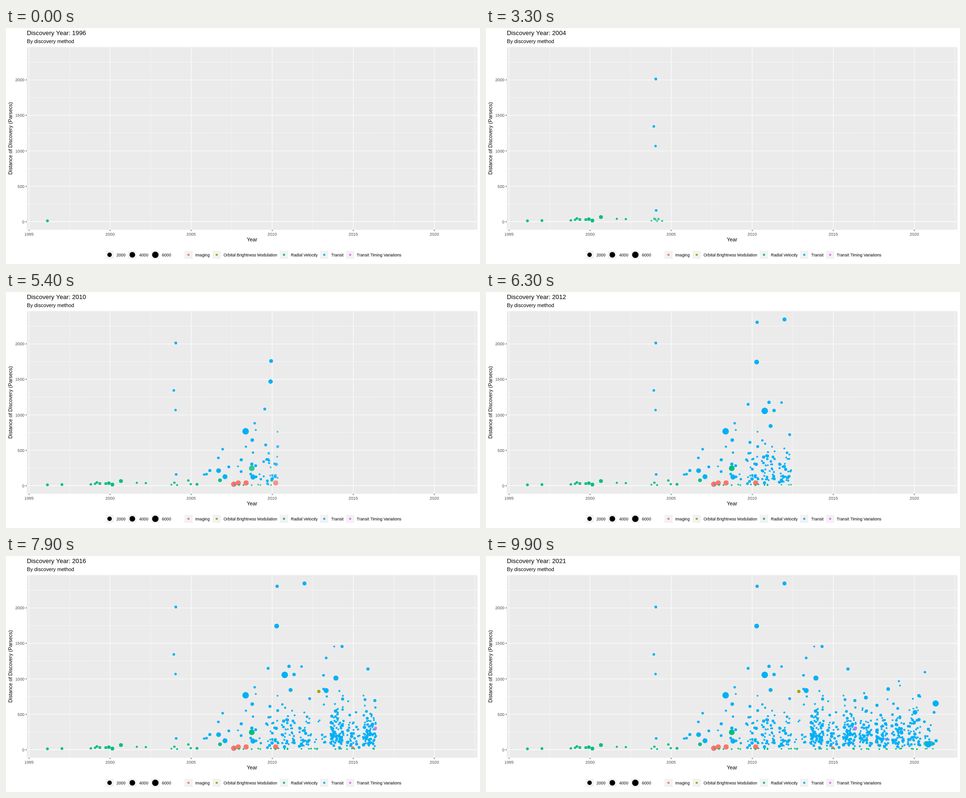
Animation of 1000x500 px, one loop 10 s. Source, as an HTML page with a canvas:

```html
<!DOCTYPE html>
<html lang="en">
<head>
<meta charset="utf-8">
<title>Discovery Year</title>
<style>
  html, body { margin: 0; width: 100%; height: 100%; overflow: hidden; background: #fff; }
  canvas { display: block; }
</style>
</head>
<body>
<canvas id="chart" width="1000" height="500"></canvas>
<script>
const ctx = document.getElementById('chart').getContext('2d');
const FRAMES = 100, FRAME_MS = 100, FIRST = 1996, LAST = 2021;
const FONT = '"Liberation Sans", Arial, sans-serif';
const yearX = year => 48.6 + (year - 1995) * 34.2;
const xYear = x => Math.round(1995 + (x - 48.6) / 34.2);
const distanceY = d => 410.4 - d * 0.1502;
const keyFrame = year => Math.round((year - FIRST) * (FRAMES - 1) / (LAST - FIRST));

// Drawn from back to front; dots are the landmarks as [x, y, radius].
const methods = [
  { label: 'Imaging', color: '#F8766D', x: 385, textX: 399, dots: [
    [480.5, 407.3, 5.7], [490, 404.5, 5.5], [506.5, 404.5, 5.5], [569, 404.5, 5.5],
    [731.5, 406, 3], [824, 393.5, 3.8]] },
  { label: 'Orbital Brightness Modulation', color: '#A3A500', x: 444.5, textX: 459, dots: [
    [660, 287, 3.4]] },
  { label: 'Radial Velocity', color: '#00BF7D', x: 586.5, textX: 601, dots: [
    [87.4, 408.5, 2.9], [118, 408, 2.9], [198, 405.7, 3], [179, 407.5, 2.6], [188, 406.3, 2.5],
    [191.8, 403.5, 2.7], [210.5, 406, 3], [217, 405, 3.7], [224.5, 408, 3.9], [242.5, 400.5, 4.1],
    [295, 404.8, 2.4], [276, 404.3, 2.2], [349, 408.3, 1.9], [355.3, 404, 2.5], [361, 409, 2],
    [384.6, 399.2, 2.5], [389.7, 407.2, 2.4], [403, 407.5, 2.9], [451.5, 398.8, 3.9],
    [518.5, 373.5, 6], [928, 397.5, 5], [940, 397.5, 5]] },
  { label: 'Transit', color: '#00B0F6', x: 671.5, textX: 686, dots: [
    [354, 208.5, 2.7], [357.7, 250, 2.6], [358.2, 108, 2.9], [359, 386.5, 2.8],
    [418, 386.8, 2.5], [423, 386, 2.8], [430, 378.2, 3.2], [448.5, 378.5, 5.1],
    [448, 351.5, 2.8], [457, 333, 2.7], [462, 391.3, 5.2], [470, 370.4, 3],
    [505.5, 295.2, 6.9], [521, 392, 5.4], [519.5, 313.7, 3.7], [524.6, 278, 2.6],
    [572, 64.2, 3.4], [571, 148.4, 5], [553, 238, 3.1], [588, 251.8, 6.9], [597, 233.7, 3.5],
    [607.7, 251, 3.6], [600.4, 283.9, 4.2], [629.7, 58.2, 4.1], [623.5, 234.2, 2.6],
    [675.5, 285, 5.3], [675.5, 216, 2.8], [696, 258.6, 5.4], [692.5, 191.8, 2], [709, 191.8, 3.2],
    [763.6, 239.3, 3.4], [801.5, 300, 4], [848.5, 281.9, 3.8], [905, 331.3, 5],
    [926, 246, 2.6], [948.6, 312.3, 6.6], [933, 399, 6.8]] },
  { label: 'Transit Timing Variations', color: '#E76BF3', x: 726, textX: 740, dots: [
    [779.5, 364.5, 3.5], [843, 387.5, 2]] }
];
const radial = methods[2], transit = methods[3];

let seed = 7;
function random() {
  seed = (seed * 1664525 + 1013904223) % 4294967296;
  return seed / 4294967296;
}
const jitteredX = year => yearX(year - 0.4 + 0.8 * random());

// Transits from 2008 on: most lie a few hundred parsecs away, with a thin far tail.
const transitCounts = [4, 9, 27, 38, 34, 14, 92, 34, 88, 60, 60, 62, 54, 14];
transitCounts.forEach((count, i) => {
  for (let n = 0; n < count; n++) {
    const distance = 25 - 125 * Math.log((1 - random()) * (1 - random()));
    transit.dots.push([jitteredX(2008 + i), distanceY(Math.min(distance, 1050)),
      1.9 + 1.6 * random() ** 2]);
  }
});

// A few small, near radial velocity dots every year.
for (let year = 2008; year <= LAST; year++) {
  for (let n = 0; n < 3; n++) radial.dots.push([jitteredX(year), 407.5 + 2 * random(), 1.8]);
}

for (const m of methods) {
  m.byYear = {};
  for (const [x, y, r] of m.dots) (m.byYear[xYear(x)] ||= []).push({ x, y, r });
}
const years = [];
for (let y = FIRST; y <= LAST; y++) if (methods.some(m => m.byYear[y])) years.push(y);

function text(string, x, y, size, color = '#000', align = 'left') {
  ctx.font = `${size}px ${FONT}`;
  ctx.fillStyle = color;
  ctx.textAlign = align;
  ctx.fillText(string, x, y);
}
function line(x1, y1, x2, y2, color, width) {
  ctx.strokeStyle = color;
  ctx.lineWidth = width;
  ctx.beginPath();
  ctx.moveTo(x1, y1);
  ctx.lineTo(x2, y2);
  ctx.stroke();
}
function disc({ x, y, r }, color, alpha = 1) {
  ctx.globalAlpha = alpha;
  ctx.fillStyle = color;
  ctx.beginPath();
  ctx.arc(x, y, r, 0, 2 * Math.PI);
  ctx.fill();
  ctx.globalAlpha = 1;
}

function drawPanel() {
  const left = 44, right = 994.5, top = 40.5, bottom = 427.5;
  ctx.fillStyle = '#EBEBEB';
  ctx.fillRect(left, top, right - left, bottom - top);
  const column = (year, w) => line(yearX(year), top, yearX(year), bottom, '#fff', w);
  const row = (d, w) => line(left, distanceY(d), right, distanceY(d), '#fff', w);
  for (let y = 1997.5; y < 2023; y += 5) column(y, 0.53);
  for (let d = 250; d < 2500; d += 500) row(d, 0.53);
  for (let y = 1995; y <= 2020; y += 5) {
    column(y, 1.07);
    line(yearX(y), bottom, yearX(y), bottom + 2.7, '#333', 1.07);
    text(y, yearX(y), 440, 8.8, '#4D4D4D', 'center');
  }
  for (let d = 0; d <= 2000; d += 500) {
    row(d, 1.07);
    line(left - 2.7, distanceY(d), left, distanceY(d), '#333', 1.07);
    text(d, 39, distanceY(d) + 3.3, 8.8, '#4D4D4D', 'right');
  }
  text('Year', 519, 452, 11, '#000', 'center');
  ctx.save();
  ctx.translate(13, 234);
  ctx.rotate(-Math.PI / 2);
  text('Distance of Discovery (Parsecs)', 0, 0, 10.8, '#000', 'center');
  ctx.restore();
}

function legendKey(x, r, color, label, textX) {
  ctx.fillStyle = '#F2F2F2';
  ctx.fillRect(x - 8.64, 471.9, 17.28, 17.28);
  disc({ x, y: 480.5, r }, color);
  text(label, textX, 483.8, 8.65);
}

function drawDots(frame) {
  let index = years.length - 1;
  while (keyFrame(years[index]) > frame) index--;
  const year = years[index], next = years[index + 1];
  const start = keyFrame(year);
  const p = next ? (frame - start) / (keyFrame(next) - start) : 0;
  const mix = (a, b) => a + (b - a) * p;

  for (const m of methods) {
    const fresh = m === transit || year === FIRST ? 1 : 0.8;
    for (const y of years.slice(0, index + 1)) {
      for (const dot of m.byYear[y] || []) disc(dot, m.color, y === year ? fresh : 1);
    }
    if (p === 0) continue;
    // Dots pair up by order with the next year; surplus ones fade in.
    const from = m.byYear[year] || [];
    (m.byYear[next] || []).forEach((b, i) => {
      const a = from[i];
      if (a) disc({ x: mix(a.x, b.x), y: mix(a.y, b.y), r: mix(a.r, b.r) }, m.color, fresh);
      else disc(b, m.color, p);
    });
  }
}

function draw(now) {
  const frame = Math.floor(now / FRAME_MS) % FRAMES;
  const year = Math.round(FIRST + (LAST - FIRST) * frame / (FRAMES - 1));
  ctx.fillStyle = '#fff';
  ctx.fillRect(0, 0, 1000, 500);
  text('Discovery Year: ' + year, 44, 15, 13.2);
  text('By discovery method', 44, 32, 10.75);
  drawPanel();
  drawDots(frame);
  legendKey(218.5, 4.7, '#000', '2000', 233);
  legendKey(266.5, 5.9, '#000', '4000', 281);
  legendKey(315, 6.8, '#000', '6000', 329);
  for (const m of methods) legendKey(m.x, 2.3, m.color, m.label, m.textX);
  requestAnimationFrame(draw);
}
requestAnimationFrame(draw);
</script>
</body>
</html>
```
